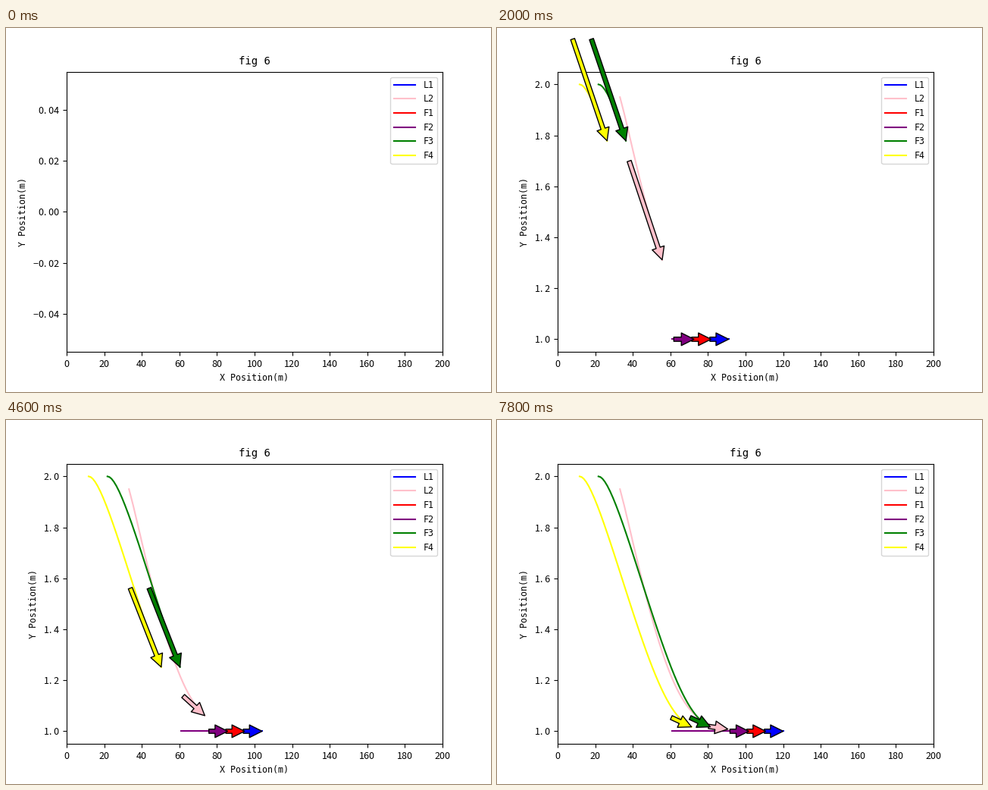
These frames come from a looping animation (640 by 480 pixels, 8000 ms). A matplotlib script:

```python
import numpy as np
import matplotlib.pyplot as plt
from matplotlib.animation import FuncAnimation

FRAMES = 40
DT = 0.1
SPEED = 10
MONO = "DejaVu Sans Mono"
DIGITS = "Noto Sans CJK JP"
COLORS = {"L1": "blue", "L2": "pink", "F1": "red",
          "F2": "purple", "F3": "green", "F4": "yellow"}


def cruise(start, gap=0):
    """Straight run in the lower lane, closing a gap early on."""
    def path(t):
        x = start + SPEED * t + gap * (1 - np.exp(-2.4 * t ** 2))
        return np.array([x, np.ones_like(t)])
    return path


def merge(end, reach, offset):
    """Lane change: the lane offset fades while the car catches up."""
    def path(t):
        z = offset(t)
        return np.array([end + SPEED * t - reach * z, 1 + z])
    return path


def lead_offset(t):
    return 1.088 * np.exp(-1.25 * t) - 0.138 * np.exp(-6.2 * t)


def tail_offset(t):
    return np.exp(-0.25 * np.abs(t) ** 2.05)


PATHS = {
    "L1": cruise(81),
    "L2": merge(51.7, 19.5, lead_offset),
    "F1": cruise(71, 0.7),
    "F2": cruise(61, 1.7),
    "F3": merge(42.6, 20.9, tail_offset),
    "F4": merge(32.6, 20.9, tail_offset),
}


def velocity(path, t, h=1e-4):
    return (path(t + h) - path(t - h)) / (2 * h)


fig, ax = plt.subplots(figsize=(6.4, 4.8), dpi=100)
ax.set_title("fig 6", family=MONO, size=10, pad=7)
ax.set_xlabel("X Position(m)", family=MONO, size=8.33, labelpad=3.4)
ax.set_ylabel("Y Position(m)", family=MONO, size=8.33, labelpad=5)
ax.set_xlim(0, 200)
ax.set_xticks(range(0, 201, 20))

trails, arrows = {}, {}
for name, color in COLORS.items():
    trails[name], = ax.plot([], [], color=color, lw=1.5, label=name)
    arrows[name] = ax.annotate("", xy=(0, 0), xytext=(0, 0),
                               arrowprops=dict(facecolor=color))
ax.legend(loc="upper right", prop={"family": MONO, "size": 8.33},
          handlelength=2.4, handletextpad=0.96, borderpad=0.38,
          borderaxespad=0.6, labelspacing=0.48)


def scale_y(low, high, step, digits):
    """Set limits half a tenth outside the data, ticks on whole steps."""
    ax.set_ylim(low, high)
    ticks = step * np.arange(np.ceil(low / step), np.floor(high / step) + 1)
    labels = [f"{v:.{digits}f}".replace("-", "\u2212").replace(".", ". ")
              for v in ticks + 0.0]
    ax.set_yticks(ticks, labels)
    for label in ax.get_xticklabels() + ax.get_yticklabels():
        label.set(family=DIGITS, size=9)


def draw(k):
    started = k > 0
    if started:
        scale_y(0.95, 2.05, 0.2, 1)
    else:
        scale_y(-0.055, 0.055, 0.02, 2)
    times = np.arange(k + 1 if started else 0) * DT
    now = np.array(k * DT)
    for name, path in PATHS.items():
        trails[name].set_data(*path(times))
        tip = path(now)
        arrow = arrows[name]
        arrow.set_visible(started)
        arrow.xy = tuple(tip)
        arrow.set_position(tuple(tip - velocity(path, now)))
    return [*trails.values(), *arrows.values()]


anim = FuncAnimation(fig, draw, frames=FRAMES, interval=200,
                     init_func=lambda: draw(0), repeat=True, repeat_delay=0)
plt.show()
```
